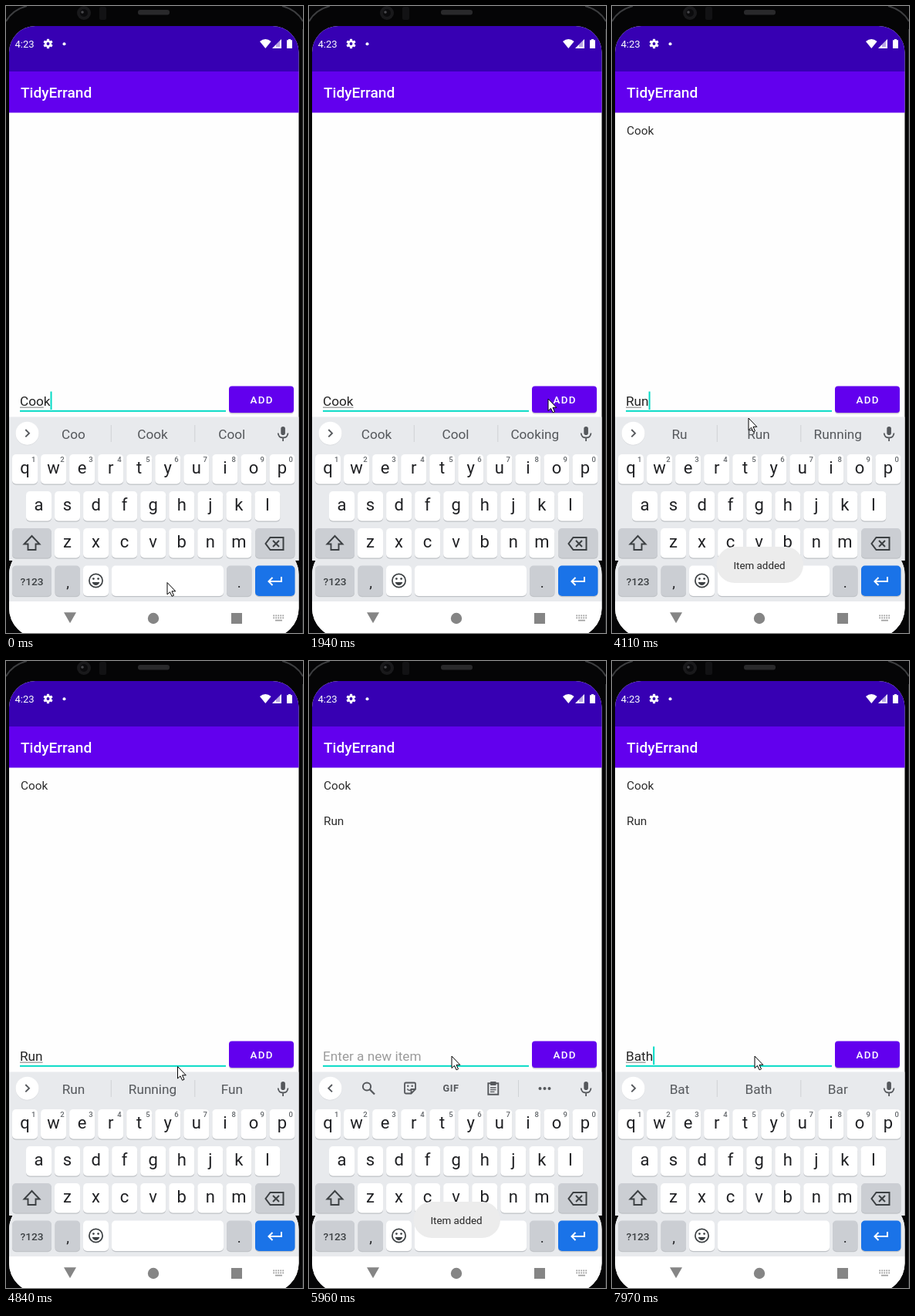
Animation, 385 px wide and 814 px high, one loop 8000 ms. Source, as an HTML page:

```html
<!DOCTYPE html>
<html lang="en">
<head>
<meta charset="utf-8">
<title>Todo list demo</title>
<style>
html, body { margin: 0; width: 100%; height: 100%; overflow: hidden; background: #050506; }
svg { display: block; width: 385px; height: 814px; font-family: Roboto, sans-serif; }
</style>
</head>
<body>
<svg id="stage" viewBox="0 0 385 814" xmlns="http://www.w3.org/2000/svg"></svg>
<script>
const NS = 'http://www.w3.org/2000/svg';
const stage = document.getElementById('stage');
const INK = '#202124', GREY = '#55585c', TEAL = '#03dac5', PURPLE = '#6200ee';
const LOOP = 8000;

function add(parent, tag, attrs, label) {
  const el = document.createElementNS(NS, tag);
  for (const k in attrs) el.setAttribute(k, attrs[k]);
  if (label !== undefined) el.textContent = label;
  parent.appendChild(el);
  return el;
}
const group = (parent, attrs = {}) => add(parent, 'g', attrs);
const rect = (p, x, y, width, height, fill, rx = 0) =>
  add(p, 'rect', { x, y, width, height, fill, rx });
const disc = (p, cx, cy, r, fill) => add(p, 'circle', { cx, cy, r, fill });
const fillPath = (p, d, fill, more = {}) => add(p, 'path', { d, fill, ...more });
const linePath = (p, d, stroke, w = 2, more = {}) =>
  add(p, 'path', { d, stroke, fill: 'none', 'stroke-width': w, ...more });
const text = (p, x, y, size, fill, label, more = {}) =>
  add(p, 'text', { x, y, 'font-size': size, fill, ...more }, label);
const MID = { 'text-anchor': 'middle' };
const MEDIUM = { 'font-weight': 500 };
const show = (el, on) => el.setAttribute('visibility', on ? 'visible' : 'hidden');

function drawBezel() {
  rect(stage, 0, 0, 385, 814, '#050506');
  linePath(stage, 'M0 20Q8 5 27 0', '#3c3d3f', 2);
  linePath(stage, 'M385 20Q377 5 358 0', '#3c3d3f', 2);
  disc(stage, 101, 9, 9, '#19191b');
  disc(stage, 101, 9, 5, '#0b0b0d');
  disc(stage, 99, 8, 1.8, '#48484c');
  rect(stage, 121, 1, 9, 17, '#121214', 2);
  rect(stage, 171, 5, 41, 6.5, '#29292b', 3);
  rect(stage, 384, 30, 1, 784, '#2a2b2d');
}

function drawAppBar(p) {
  rect(p, 0, 20, 385, 65, '#3700b3');
  text(p, 11.5, 54, 13, '#fff', '4:23');
  const gear = group(p, { transform: 'translate(54.5 49)' });
  for (let a = 0; a < 360; a += 60)
    add(gear, 'rect', { x: -1.6, y: -6.2, width: 3.2, height: 4, rx: .6, fill: '#fff', transform: `rotate(${a})` });
  add(gear, 'circle', { r: 3.3, fill: 'none', stroke: '#fff', 'stroke-width': 2.6 });
  disc(p, 75.5, 49.3, 2, '#fff');
  fillPath(p, 'M329 46Q336.3 40 343.6 46L336.3 55Z', '#fff');
  fillPath(p, 'M357 43V55H345Z', '#fff');
  fillPath(p, 'M350 50L355 45V53H350Z', '#3700b3', { opacity: .35 });
  fillPath(p, 'M364 44.3H366V43H369V44.3H371V55H364Z', '#fff');
  rect(p, 0, 85, 385, 53.5, PURPLE);
  text(p, 19, 119.3, 19.1, '#fff', 'TidyErrand', MEDIUM);
}

function drawKey(p, x, y, w, h, fill) {
  rect(p, x, y + 1.2, w, h, '#bfc2c6', 5);
  rect(p, x, y, w, h, fill, 5);
}

function drawKeyboard(p) {
  const DIM = '#cbced3', PITCH = 37.05;
  rect(p, 0, 533.5, 385, 239.5, '#e8eaed');
  const rows = [['qwertyuiop', 24.5, 582], ['asdfghjkl', 42.5, 630], ['zxcvbnm', 79.5, 678]];
  rows.forEach(([letters, x0, y], row) => [...letters].forEach((ch, i) => {
    const x = x0 + i * PITCH;
    drawKey(p, x - 16.5, y, 33, 38.5, '#fff');
    text(p, x, y + 25.3, 22, INK, ch, MID);
    if (!row) text(p, x + 11.3, y + 10, 9.5, '#62666a', (i + 1) % 10, { ...MID, ...MEDIUM });
  }));
  drawKey(p, 8, 678, 51, 38.5, DIM);
  drawKey(p, 323, 678, 51.5, 38.5, DIM);
  drawKey(p, 8, 726.5, 51, 39.5, DIM);
  drawKey(p, 63.5, 726.5, 32.5, 39.5, DIM);
  drawKey(p, 100, 726.5, 33, 39.5, '#fff');
  drawKey(p, 137, 726.5, 145, 39.5, '#fff');
  drawKey(p, 286, 726.5, 32.5, 39.5, DIM);
  drawKey(p, 323, 726.5, 51.5, 39.5, '#1a73e8');

  const DARK = '#3c4043';
  linePath(p, 'M33.5 688L43.5 698.5H38.5V706H28.5V698.5H23.5Z', DARK, 1.9);
  linePath(p, 'M342.5 690H359.5V706H342.5L336.5 698Z', DARK, 2);
  linePath(p, 'M346 694L354 702M354 694L346 702', DARK, 2);
  text(p, 33.5, 751.5, 13.7, DARK, '?123', { ...MID, ...MEDIUM });
  text(p, 80, 755, 19, INK, ',', MID);
  text(p, 302.3, 755, 19, INK, '.', MID);
  add(p, 'circle', { cx: 116.5, cy: 746, r: 8.6, fill: 'none', stroke: DARK, 'stroke-width': 1.7 });
  disc(p, 113.4, 743.6, 1.4, DARK);
  disc(p, 119.6, 743.6, 1.4, DARK);
  fillPath(p, 'M111.6 748H121.4Q119.8 752 116.5 752T111.6 748Z', DARK);
  linePath(p, 'M357 741V747H341M345.5 742L340.5 747L345.5 752', '#fff', 2);

  disc(p, 27.5, 555.3, 15.2, '#d9dbde');
  disc(p, 27.5, 554.7, 15, '#fff');
  rect(p, 356.3, 546, 5.6, 11, GREY, 2.8);
  linePath(p, 'M352.7 554.5Q353.2 560.5 359.1 560.5T365.5 554.5M359.1 560.5V565', GREY, 1.8);
}

function drawTools(p) {
  linePath(p, 'M30 550L25.3 554.7L30 559.4', GREY, 1.9);
  add(p, 'circle', { cx: 75, cy: 552.5, r: 5.1, fill: 'none', stroke: GREY, 'stroke-width': 2 });
  linePath(p, 'M78.8 556.3L85 562.5', GREY, 2.3);
  linePath(p, 'M138 556V549Q138 547.5 136.5 547.5H125.5Q124 547.5 124 549V560Q124 561.5 125.5 561.5H132.5ZM132.5 561.5V556H138', GREY, 1.8);
  linePath(p, 'M127.3 555.5Q130 559 133 556', GREY, 1.5);
  disc(p, 128.3, 551.8, 1.2, GREY);
  disc(p, 133.7, 551.8, 1.2, GREY);
  text(p, 184, 559.2, 12.7, GREY, 'GIF', { ...MID, 'font-weight': 700, 'letter-spacing': .5 });
  linePath(p, 'M232.3 548.3H245.3V562.7H232.3Z', GREY, 1.9);
  rect(p, 235, 546, 7.6, 5, GREY, 1);
  linePath(p, 'M235 554H242.5M235 556.7H242.5M235 559.4H240.5', GREY, 1.3);
  rect(p, 271, 544, 1, 22, '#cfd2d5');
  for (const x of [299.5, 305.5, 311.5]) disc(p, x, 555, 2, GREY);
}

function drawNav(p) {
  const C = '#858585';
  rect(p, 0, 773, 385, 50, '#fff');
  fillPath(p, 'M75 787.3H91L83 801.3Z', C);
  disc(p, 191, 795, 7.2, C);
  rect(p, 292, 788, 14, 14, C);
  for (let i = 0; i < 5; i++)
    for (let j = 0; j < 2; j++) rect(p, 346.3 + i * 3, 790.5 + j * 3, 1.8, 1.8, '#a0a0a0');
  rect(p, 349, 796.8, 9, 1.7, '#a0a0a0');
}

drawBezel();
const clip = add(add(stage, 'defs', {}), 'clipPath', { id: 'screen' });
add(clip, 'rect', { x: 4, y: 26, width: 375.5, height: 100, rx: 34 });
add(clip, 'rect', { x: 4, y: 70, width: 375.5, height: 650 });
add(clip, 'rect', { x: 4, y: 700, width: 375.5, height: 120, rx: 38 });
const screen = group(stage, { 'clip-path': 'url(#screen)' });
rect(screen, 0, 20, 385, 810, '#fefefe');
drawAppBar(screen);

const items = ['Cook', 'Run'].map((name, i) =>
  text(screen, 19, 167.4 + i * 46, 15.3, '#2b2b2b', name));

// Input row
const FIELD = 17.2;
const hint = text(screen, 18, 518.6, FIELD, '#9b9b9b', 'Enter a new item');
const field = text(screen, 18, 518.6, FIELD, '#242424', '');
const compose = rect(screen, 18, 520.6, 0, 1, '#777');
rect(screen, 18, 524.8, 267, 2, TEAL);
const caret = rect(screen, 18, 500.5, 2, 23.5, TEAL);
rect(screen, 289, 495, 84, 34.5, '#c9c4d2', 4);
rect(screen, 289, 493.5, 84, 34.5, PURPLE, 4);
const ripple = rect(screen, 289, 493.5, 84, 34.5, '#fff', 4);
text(screen, 331.6, 516.3, 13.4, '#fff', 'ADD', { ...MID, ...MEDIUM, 'letter-spacing': 1.2 });

drawKeyboard(screen);
const tools = group(screen);
drawTools(tools);
const strip = group(screen);
linePath(strip, 'M25.3 550L30 554.7L25.3 559.4', GREY, 1.9);
rect(strip, 135.8, 544, 1, 22, '#cfd2d5');
rect(strip, 244.3, 544, 1, 22, '#cfd2d5');
const words = [87.5, 190, 292.8].map(x => text(strip, x, 561.5, FIELD, GREY, '', MID));
drawNav(screen);

const toast = group(screen);
rect(toast, 135.5, 702, 112.5, 47, '#ececec', 23.5);
text(toast, 191, 731, 13.4, '#262626', 'Item added', MID);

const pointer = fillPath(stage, 'M.5 .5V16L4 12.8L6.6 18.3L9 17.2L6.5 11.8H11.3Z', '#fff',
  { stroke: '#000', 'stroke-width': 1, 'stroke-linejoin': 'round' });

// Each step lists only what changes; mark = count of underlined letters.
const steps = [
  [0, { input: 'Cook', mark: 3, sug: 'Coo Cook Cool', caret: 1, press: 0, done: 0, toast: 0, at: [208.5, 748] }],
  [300, { mark: 4, sug: 'Cook Cool Cooking' }],
  [580, { caret: 0 }],
  [715, { at: [222, 720] }],
  [850, { at: [270, 620] }],
  [985, { at: [325, 520] }],
  [1120, { at: [349, 477], caret: 1 }],
  [1255, { at: [338, 490] }],
  [1390, { at: [322, 508] }],
  [1520, { at: [311, 518] }],
  [1670, { at: [310, 514], caret: 0 }],
  [1805, { at: [309.5, 511] }],
  [1940, { at: [309.5, 509.5] }],
  [2220, { caret: 1, press: .1 }],
  [2360, { input: '', mark: 0, press: .2 }],
  [2500, { done: 1, sug: '', toast: 1, press: .12 }],
  [2640, { at: [285, 515], press: .04 }],
  [2780, { at: [212, 531], press: 0 }],
  [2910, { at: [176.5, 534.5], caret: 0 }],
  [3310, { caret: 1 }],
  [3590, { input: 'R' }],
  [3760, { mark: 1, sug: 'R Run Right' }],
  [3940, { input: 'Ru' }],
  [4110, { input: 'Run', mark: 2, sug: 'Ru Run Running' }],
  [4380, { mark: 3, sug: 'Run Running Fun' }],
  [4530, { toast: .5 }],
  [4680, { toast: 0, caret: 0, at: [186, 533] }],
  [4825, { at: [222, 526] }],
  [4975, { at: [265, 515] }],
  [5125, { at: [297, 506], caret: 1 }],
  [5270, { at: [305.5, 503.5], press: .1 }],
  [5420, { input: '', mark: 0, press: .2 }],
  [5570, { done: 2, sug: '', toast: 1, press: .12 }],
  [5700, { at: [262, 506], press: .04 }],
  [5830, { at: [204, 511], press: 0 }],
  [5960, { at: [184.5, 512.5], caret: 0 }],
  [6390, { caret: 1 }],
  [6820, { input: 'B' }],
  [7090, { input: 'Ba', mark: 1, sug: 'B But Best' }],
  [7370, { mark: 2, sug: 'Ba Bad Back' }],
  [7520, { input: 'Bat' }],
  [7670, { mark: 3, sug: 'Bat Bath Bar', toast: .5 }],
  [7820, { toast: 0 }],
  [7970, { input: 'Bath' }]
];

function stateAt(t) {
  const s = {};
  for (const [start, change] of steps) {
    if (start > t) break;
    Object.assign(s, change);
  }
  return s;
}

function render(t) {
  const s = stateAt(t);
  if (field.textContent !== s.input) field.textContent = s.input;
  show(hint, !s.input);
  compose.setAttribute('width', s.mark ? field.getSubStringLength(0, s.mark) : 0);
  caret.setAttribute('x', 18 + (s.input ? field.getComputedTextLength() : 0));
  show(caret, s.caret);
  ripple.setAttribute('opacity', s.press);
  items.forEach((el, i) => show(el, i < s.done));
  show(tools, !s.sug);
  show(strip, s.sug);
  const list = s.sug.split(' ');
  words.forEach((el, i) => { el.textContent = list[i] || ''; });
  toast.setAttribute('opacity', s.toast);
  pointer.setAttribute('transform', `translate(${s.at})`);
}

const began = performance.now();
function tick() {
  render((performance.now() - began) % LOOP);
  requestAnimationFrame(tick);
}
tick();
</script>
</body>
</html>
```
